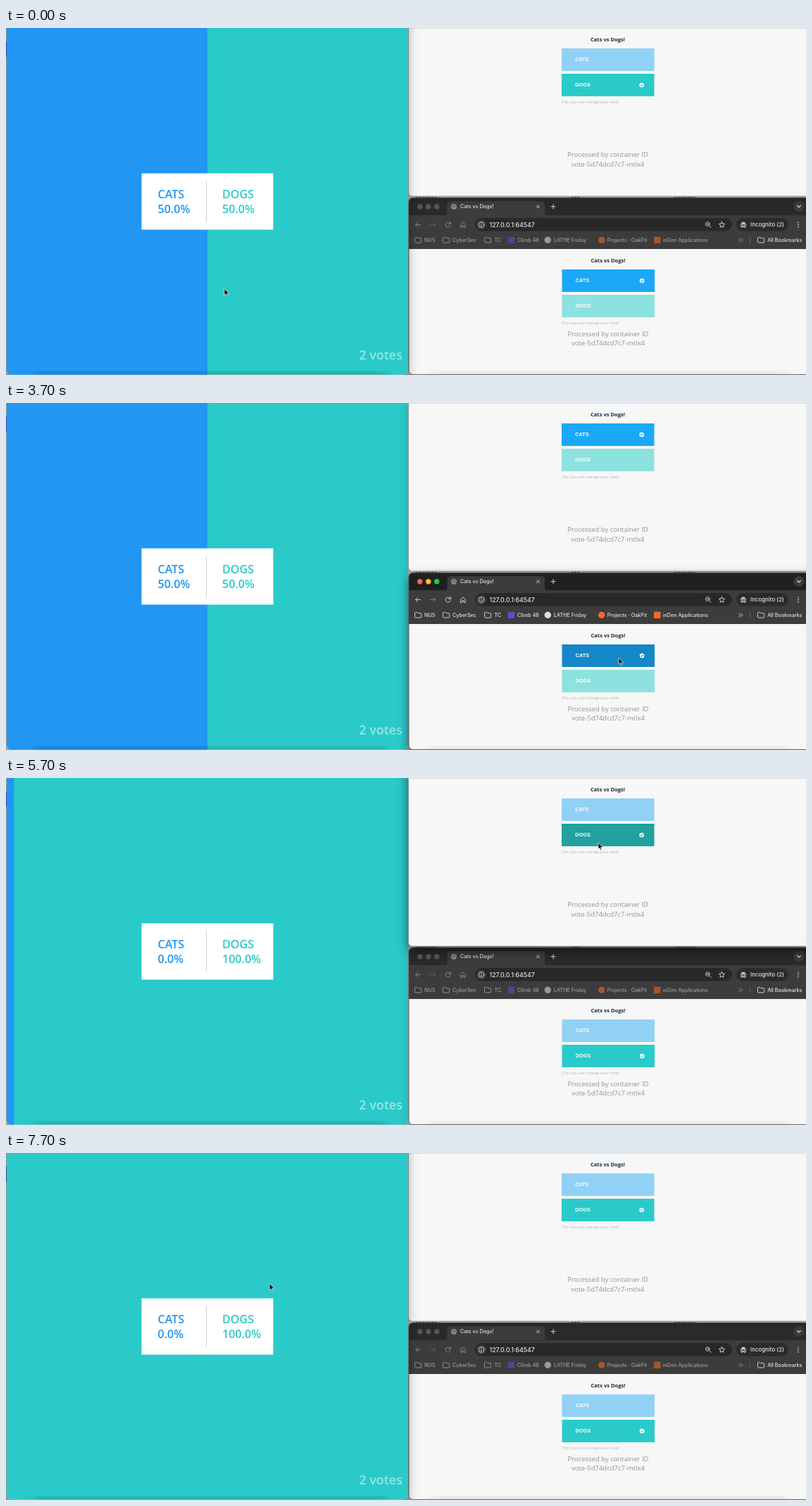
These frames come from a looping animation (1136 by 493 pixels, 8000 ms). An HTML page:

```html
<!DOCTYPE html>
<html lang="en">
<head>
<meta charset="utf-8">
<title>Cats vs Dogs!</title>
<style>
html, body { margin: 0; width: 100%; height: 100%; overflow: hidden; background: #9b9b9b; }
svg { display: block; width: 1136px; height: 493px; }
text { white-space: pre; }
.web { font-family: "Open Sans", sans-serif; }
.btn { font: bold 7.3px "Liberation Sans", Arial, sans-serif; fill: #fff; }
.ui { font: 500 7.2px Inter, sans-serif; fill: #e3e3e3; }
.line { fill: none; stroke: #d0d0d0; stroke-width: 1; stroke-linecap: round; stroke-linejoin: round; }
.stat { font-weight: 600; font-size: 16.1px; }
.shadow { filter: url(#soft); }
</style>
</head>
<body>
<svg id="stage" viewBox="0 0 1136 493" xmlns="http://www.w3.org/2000/svg"></svg>
<script>
const LOOP = 8000;
const CATS = '#2196f3', DOGS = '#2acaca';
const stage = document.getElementById('stage');
const $ = id => document.getElementById(id);

const rect = (x, y, w, h, fill, more = '') =>
  `<rect x="${x}" y="${y}" width="${w}" height="${h}" fill="${fill}" ${more}/>`;
const text = (x, y, str, cls, more = '') =>
  `<text x="${x}" y="${y}" class="${cls}" ${more}>${str}</text>`;
const line = (d, more = '') => `<path class="line" d="${d}" ${more}/>`;
const dot = (x, y, r, fill, more = '') => `<circle cx="${x}" cy="${y}" r="${r}" fill="${fill}" ${more}/>`;
const shadow = (name, x, y, w, h) =>
  rect(x, y, w, h, '#000', `id="${name}Shadow" class="shadow" rx="6"`);

function button(name, x, y, label) {
  return `<g id="${name}">
    ${rect(x, y, 131.5, 32, '#fff', `id="${name}Fill"`)}
    ${text(x + 19.3, y + 18.2, label, 'btn')}
    <g id="${name}Tick">
      ${dot(x + 113.6, y + 16, 3.3, '#fff')}
      <path id="${name}Mark" d="M${x + 111.9} ${y + 16}l1.3 1.3 2.3-2.4" fill="none" stroke-width="1.1"/>
    </g></g>`;
}

function votePage(name, dx, dy, footer) {
  const mid = 854.5 + dx, centred = 'text-anchor="middle"';
  return text(mid, 19 + dy, 'Cats vs Dogs!', 'web', `${centred} font-size="7.6" font-weight="700" fill="#1b2b38"`) +
    button(name + 'Cats', 789 + dx, 29 + dy, 'CATS') +
    button(name + 'Dogs', 789 + dx, 65 + dy, 'DOGS') +
    text(788.8 + dx, 106.7 + dy, '(Tip: you can change your vote)', 'web', 'font-size="5.6" fill="#a9b2ba"') +
    `<g font-size="9.53" fill="#8a959e">
      ${text(mid, footer, 'Processed by container ID', 'web', centred)}
      ${text(mid, footer + 13.2, 'vote-5d74dcd7c7-mtlx4', 'web', centred)}</g>`;
}

const folder = x =>
  line(`M${x} 298.3q0-1 1-1h2.4l1.2 1.3h3.6q1 0 1 1v4.4q0 1-1 1h-7.2q-1 0-1-1z`);

function resultWindow() {
  return `<g id="left">${shadow('left', 1, -40, 570, 532)}
    <g clip-path="url(#leftClip)">
      ${rect(0, 0, 572, 493, '#fff')}
      <g id="results" class="web">
        ${rect(1, 0, 571, 493, DOGS)}
        ${rect(1, 0, 285, 493, CATS, 'id="share"')}
        ${rect(192.5, 206.5, 187, 80, '#fff')}
        ${rect(284, 217, 1, 59, '#c9d0d4')}
        <g class="stat" fill="${CATS}">${text(215.5, 242, 'CATS', 'stat')}${text(215.5, 263, '', 'stat', 'id="catsPct"')}</g>
        <g class="stat" fill="${DOGS}">${text(307, 242, 'DOGS', 'stat')}${text(307, 263, '', 'stat', 'id="dogsPct"')}</g>
        ${text(563, 471, '2 votes', 'web', 'text-anchor="end" font-size="18" font-weight="600" fill="#fff" fill-opacity=".5"')}
      </g>
      ${rect(40, 492, 500, 10, '#000', 'class="shadow" opacity=".3"')}
    </g></g>`;
}

function topWindow() {
  return `<g id="top">${shadow('top', 571, -40, 600, 279)}
    ${rect(571.5, -20, 600, 259, '#f7f7f7', 'rx="5" stroke="#8c8c8c" stroke-width=".8"')}
    ${rect(571, 0, 565, .7, '#d2d2d2')}
    ${votePage('top', 0, 0, 183.4)}</g>`;
}

function bottomWindow() {
  const lights = [587.7, 599.8, 611.7].map((x, i) => dot(x, 253.7, 3.7, '#555', `id="light${i}"`)).join('');
  return `<g id="bottom">${shadow('bottom', 572, 241, 600, 251)}
    <g clip-path="url(#bottomClip)">
      ${rect(571, 241, 570, 252, '#f7f7f7')}
      ${rect(571, 241, 570, 26, '#1f2020', 'id="tabStrip"')}
      ${rect(571, 266, 570, 48, '#3c3c3c')}
      <path d="M622 266.5q4.500 0 4.500-4.500v-11q0-5 5-5h128.500q5 0 5 5v11q0 4.500 4.500 4.500z" fill="#3c3c3c"/>
      ${lights}
      ${dot(636, 253.8, 4, '#8b8f93')}
      ${line('M633 252.500l2.300 1 .8 2M637 250.500l-.6 1.800 2.200 1.300', 'style="stroke:#4a4a4a"')}
      ${text(645, 256.3, 'Cats vs Dogs!', 'ui')}
      ${line('M753.500 251.700l4 4m0-4l-4 4M773.800 253.700h6.400m-3.200-3.200v6.400')}
      ${dot(1126, 253.500, 7.500, '#3c3c3c')}
      ${line('M1123.700 252.500l2.300 2.300 2.300-2.300', 'style="stroke-width:1.300"')}
      ${rect(666, 270, 365, 18.500, '#282828', 'rx="9.200"')}
      ${rect(1037, 270, 74, 18.500, '#2b2b2b', 'rx="9.200"')}
      <g id="dimNav">
        ${line('M588.500 279.500h-7m3-3l-3 3 3 3')}
        ${line('M602.500 279.500h7m-3-3l3 3-3 3', 'opacity=".45"')}
        ${line('M631 278.200a3.500 3.500 0 1 0 .1 2.400M631.300 275.800v2.500h-2.500')}
        ${line('M645.700 279l3.300-3 3.300 3v4.300h-2.200v-2.600h-2.200v2.600h-2.200z')}
      </g>
      ${dot(675, 279.500, 7, '#3c3c3c')}
      ${line('M675 279.200v2.200M675 277.200v.1')}
      <circle class="line" cx="675" cy="279.500" r="3.800"/>
      ${text(686.5, 282.700, '127.0.0.1:64547', 'ui', 'style="font-size:8.800px"')}
      <circle class="line" cx="996.300" cy="278.500" r="2.800"/>
      ${line('M998.500 280.800l2.500 2.500M995.200 278.500h2.200')}
      ${line('M1016.500 275.300l1.200 2.700 2.900.3-2.200 2 .6 2.900-2.500-1.500-2.500 1.500.6-2.900-2.200-2 2.900-.3z')}
      <path d="M1044 278.500l.9-2.700h4.200l.9 2.700z" fill="#d0d0d0"/>
      ${line('M1042.700 279h8.600M1046.300 281.800h1.400')}
      <circle class="line" cx="1045" cy="282" r="1.400"/><circle class="line" cx="1049" cy="282" r="1.400"/>
      ${text(1057, 282.300, 'Incognito (2)', 'ui', 'style="font-size:7.900px"')}
      ${[276.3, 279.5, 282.7].map(y => dot(1125, y, .9, '#c4c4c4')).join('')}
      <g id="dimMarks">
        ${folder(580.500)}${text(594, 303.800, 'NUS', 'ui')}
        ${folder(620.500)}${text(634, 303.800, 'CyberSec', 'ui')}
        ${folder(679.500)}${text(693.500, 303.800, 'TC', 'ui')}
        ${rect(712.500, 296.500, 9.500, 9.500, '#5550c8')}${text(726, 303.800, 'Climb 48', 'ui')}
        ${dot(769.300, 301.300, 4.700, '#e9d9cf')}${text(778, 303.800, 'LATHE Friday', 'ui')}
        ${dot(845.800, 301.300, 4.700, '#f26a2b')}${text(853.700, 303.800, 'Projects · OakPit', 'ui')}
        ${rect(920, 296.500, 9.500, 9.500, '#ee6a1f')}${text(932.700, 303.800, 'inDen Applications', 'ui')}
        ${line('M1040.700 299l2.200 2.300-2.200 2.300M1043.900 299l2.200 2.300-2.200 2.300')}
      </g>
      ${rect(1056, 296.500, .8, 9.500, '#686868')}
      ${folder(1067.500)}${text(1081.200, 303.800, 'All Bookmarks', 'ui')}
      ${votePage('bottom', .5, 314, 437.500)}
      ${rect(600, 492.500, 510, 10, '#000', 'class="shadow" opacity=".16"')}
    </g>
    ${rect(572, 241.400, 600, 251, 'none', 'rx="6" stroke="#4d4d4d" stroke-width=".8"')}</g>`;
}

stage.innerHTML = `<defs>
    <filter id="soft" x="-20%" y="-50%" width="140%" height="200%"><feGaussianBlur stdDeviation="8"/></filter>
    <clipPath id="leftClip"><rect x="1" y="-20" width="570" height="512.500" rx="7"/></clipPath>
    <clipPath id="bottomClip"><rect x="572" y="241" width="600" height="251.500" rx="6"/></clipPath>
  </defs>
  ${rect(0, 0, 1136, 493, '#a9a9a9')}
  ${rect(0, 19, 1, 22, '#5b3fa8')}
  ${rect(571, 238, 565, 4, '#b9bbbb')}
  ${[[582, 29], [803, 11], [950, 28]].map(([x, w]) =>
    line(`M${x} 240.500h${w}`, 'style="stroke:#444" stroke-dasharray="2 2.500"')).join('')}
  <g id="windows">${topWindow()}${bottomWindow()}${resultWindow()}</g>
  <path id="cursor" d="M0 0v9.300l2.100-2 1.500 3.300 1.500-.7-1.500-3.200h3z" fill="#000" stroke="#fff" stroke-width=".7"/>`;

// Timelines: [start ms, value]
const focusTimes = [[0, 'left'], [580, 'bottom'], [2380, 'top'], [3280, 'bottom'], [5180, 'top'], [6380, 'left']];
const topVotes = [[0, 'Dogs'], [2680, 'Cats'], [5430, 'Dogs']];
const bottomVotes = [[0, 'Cats'], [1180, 'Dogs'], [3600, 'Cats'], [4780, 'Dogs']];
const catShares = [[-1000, .5], [1470, 0], [2942, .5], [3952, 1], [5022, .5], [5528, 0], [6980, .5], [7097, 0]];
const RELOAD = 6980;
const pointer = [
  [0, 310, 370.500], [20, 310, 370.500], [300, 860, 478], [420, 860, 478], [700, 866, 398], [1410, 866, 398],
  [1700, 825.500, 109], [2000, 840.500, 51.800], [3000, 840.500, 51.800], [3250, 870, 362],
  [3820, 870, 362], [4100, 877, 397], [4820, 877, 397], [5150, 841, 92], [6010, 841, 92],
  [6200, 374, 185.500], [LOOP, 374, 185.500]
];
const stacking = {
  left: ['bottom', 'top', 'left'],
  top: ['left', 'bottom', 'top'],
  bottom: ['left', 'top', 'bottom']
};
const shades = {
  Cats: { on: '#1ca8f8', onHover: '#1587c7', off: '#91d1f6', offHover: '#8bbedc' },
  Dogs: { on: '#2acaca', onHover: '#22a1a0', off: '#8ce2df', offHover: '#8acdca' }
};

const indexAt = (list, t) => list.findLastIndex(([start]) => start <= t);
const valueAt = (list, t) => list[indexAt(list, t)][1];
const clamp = v => Math.min(1, Math.max(0, v));

// cubic-bezier(.42, 0, .58, 1)
function easeInOut(p) {
  let lo = 0, hi = 1, u = .5;
  for (let i = 0; i < 18; i++) {
    u = (lo + hi) / 2;
    const x = 1.26 * u * (1 - u) ** 2 + 1.74 * u * u * (1 - u) + u ** 3;
    if (x < p) lo = u; else hi = u;
  }
  return u * u * (3 - 2 * u);
}

function pointerAt(t) {
  const i = Math.min(indexAt(pointer, t), pointer.length - 2);
  const [t0, x0, y0] = pointer[i], [t1, x1, y1] = pointer[i + 1];
  const p = clamp((t - t0) / (t1 - t0)), s = p * p * (3 - 2 * p);
  return [x0 + (x1 - x0) * s, y0 + (y1 - y0) * s];
}

function drawButtons(name, dx, dy, vote, focused, [x, y]) {
  for (const [pet, top] of [['Cats', 29], ['Dogs', 65]]) {
    const over = focused && x > 789 + dx && x < 920.5 + dx && y > top + dy && y < top + 32 + dy;
    const picked = vote === pet;
    const fill = shades[pet][(picked ? 'on' : 'off') + (over ? 'Hover' : '')];
    $(name + pet + 'Fill').setAttribute('fill', fill);
    $(name + pet + 'Mark').setAttribute('stroke', fill);
    $(name + pet + 'Tick').setAttribute('opacity', picked ? 1 : 0);
  }
}

let front = '';
function setFocus(focus) {
  if (focus === front) return;
  front = focus;
  for (const name of stacking[focus]) {
    $('windows').append($(name));
    const active = name === focus;
    const strength = active ? (name === 'left' ? .3 : .55) : .15;
    $(name + 'Shadow').setAttribute('opacity', strength);
    $(name + 'Shadow').setAttribute('transform', `translate(0 ${active ? 6 : 2})`);
  }
  const active = focus === 'bottom';
  ['#ff5f57', '#febc2e', '#28c840'].forEach((c, i) => $('light' + i).setAttribute('fill', active ? c : '#575757'));
  $('tabStrip').setAttribute('fill', active ? '#1f2020' : '#292a2a');
  $('dimNav').setAttribute('opacity', active ? 1 : .5);
  $('dimMarks').setAttribute('opacity', active ? 1 : .58);
}

function render(t) {
  const focus = valueAt(focusTimes, t), at = pointerAt(t);
  setFocus(focus);
  drawButtons('top', 0, 0, valueAt(topVotes, t), focus === 'top', at);
  drawButtons('bottom', .5, 314, valueAt(bottomVotes, t), focus === 'bottom', at);

  const i = indexAt(catShares, t), [start, share] = catShares[i];
  const from = start === RELOAD || i === 0 ? share : catShares[i - 1][1];
  const shown = from + (share - from) * easeInOut(clamp((t - start) / 200));
  $('share').setAttribute('width', Math.max(0, shown * 570));
  $('catsPct').textContent = (share * 100).toFixed(1) + '%';
  $('dogsPct').textContent = (100 - share * 100).toFixed(1) + '%';
  $('results').setAttribute('opacity', t < RELOAD ? 1 : clamp((t - RELOAD) / 510));

  $('cursor').setAttribute('transform', `translate(${at[0]} ${at[1]})`);
}

const begin = performance.now();
function tick() {
  render((performance.now() - begin) % LOOP);
  requestAnimationFrame(tick);
}
tick();
</script>
</body>
</html>
```
